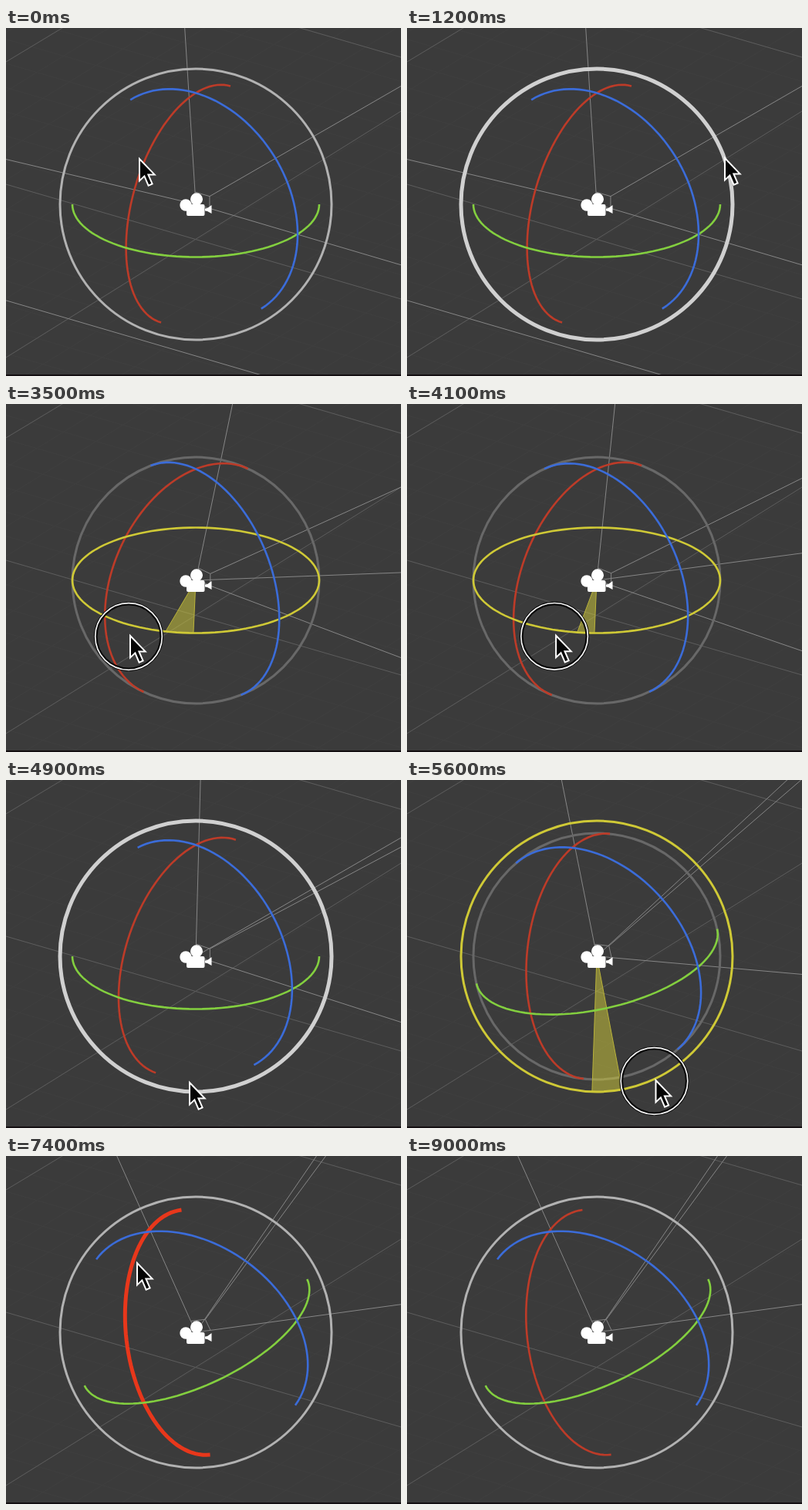
These frames come from a looping animation (512 px wide and 452 px high, 9500 ms). An HTML page:

```html
<!DOCTYPE html>
<html lang="en">
<head>
<meta charset="utf-8">
<title>Rotation gizmo</title>
<style>
html, body { margin: 0; width: 100%; height: 100%; overflow: hidden; background: #3b3b3b; }
svg { display: block; width: 512px; height: 452px; }
</style>
</head>
<body>
<svg id="stage" viewBox="0 0 512 452" fill="none">
  <rect width="512" height="452" fill="#3b3b3b"/>
  <path id="minor" stroke="#3f3f3f"/>
  <path id="major" stroke="#5c5c5c"/>
  <path id="frustum" stroke="#868686"/>
  <circle id="disc" cx="246" cy="229" r="160" stroke="#686868" stroke-width="3"/>
  <path id="wedge" fill="#d6cf3c" fill-opacity=".5" stroke="#b9b23a" stroke-width="1"/>
  <circle id="ring" cx="246" cy="229" r="176"/>
  <path id="x"/>
  <path id="y"/>
  <path id="z"/>
  <g fill="#fff">
    <circle cx="233" cy="230" r="7.7"/>
    <circle cx="247" cy="222.3" r="8"/>
    <rect x="234" y="229" width="23.5" height="15" rx="2"/>
    <path d="M258 234.5L261 234L266.5 230V241L261 238L258 237.5Z"/>
  </g>
  <g id="cursor">
    <g id="press">
      <circle cx="-1" cy="2" r="42.7" stroke="#080808" stroke-width="4.6"/>
      <circle cx="-1" cy="2" r="43.3" stroke="#f4f4f4" stroke-width="1.7"/>
    </g>
    <path d="M1 1V29.5L7.4 23.4L12.6 35.6L17.6 33.4L12.4 21.4H20.6Z" fill="#050505" stroke="#fff" stroke-width="2"/>
  </g>
  <rect y="450" width="512" height="2" fill="#140f12"/>
</svg>
<script>
const LOOP = 9500, FRAME = 100;
const CX = 246, CY = 229, R = 160, RING = 176;
const SP = 0.428, CP = Math.sqrt(1 - SP * SP);   // view pitch
const RAD = Math.PI / 180, PER_PX = 0.157;       // degrees turned per dragged pixel
const YAW = 34.4, GRAB_X = 243, DROP_X = 215.6;
const ROLL_X = 240, ROLL_END = 403;
const HALF_W = 0.765, HALF_H = 0.578, NEAR = 15, FAR = 53700;

const $ = id => document.getElementById(id);
const set = (id, attrs) => { for (const k in attrs) $(id).setAttribute(k, attrs[k]); };
const show = (id, on) => set(id, { display: on ? 'inline' : 'none' });

// time, x, y of the pointer tip
const moves = [
  [0, 172, 169], [400, 244, 188], [700, 244, 188], [1200, 411, 168], [1300, 411, 168],
  [1700, 434, 150], [2000, 405, 150], [2300, 405, 150], [2400, 337, 181], [3000, 243, 297],
  [3300, 243, 297], [3500, 160, 300], [3700, 125, 302], [4300, 215.6, 299], [4400, 215.6, 299],
  [4900, 237, 392], [5200, 240, 398], [6000, 403, 380], [6200, 366, 225], [6300, 352, 167],
  [6600, 423, 250], [6900, 350, 376], [7000, 350, 376], [7400, 169, 138], [8000, 230, 175],
  [8900, 230, 175]
];

// time, hovered or dragged handle
const modes = [
  [0, ''], [1000, 'z'], [1100, ''], [1200, 'ring'], [1500, ''], [1900, 'ring'], [2400, 'z'],
  [2700, ''], [2900, 'y'], [3100, 'dragY'], [4400, 'y'], [4600, ''], [4800, 'ring'],
  [5200, 'dragRing'], [6100, 'ring'], [6200, 'z'], [6500, 'ring'], [6600, ''],
  [6900, 'ring'], [7100, ''], [7300, 'x'], [7600, '']
];

const colors = {
  x: ['#bd3b28', '#e8371b'],
  y: ['#83cf3f', '#94f03a'],
  z: ['#3b6cd9', '#2f6dff'],
  ring: ['#b2b2b2', '#d0d0d0']
};
const ACTIVE = '#cfc936';

function tipAt(t) {
  let i = 0;
  while (i < moves.length - 2 && t >= moves[i + 1][0]) i++;
  const [t0, x0, y0] = moves[i], [t1, x1, y1] = moves[i + 1];
  const p = Math.min(1, (t - t0) / (t1 - t0)), e = p * p * (3 - 2 * p);
  return [x0 + (x1 - x0) * e, y0 + (y1 - y0) * e];
}

const modeAt = t => modes.filter(m => m[0] <= t).pop()[1];

function roll([x, y, w], deg) {
  const c = Math.cos(deg * RAD), s = Math.sin(deg * RAD);
  return [x * c - y * s, x * s + y * c, w];
}

const at = (x, y) => (CX + x).toFixed(2) + ' ' + (CY - y).toFixed(2);
const poly = pts => 'M' + pts.map(p => at(p[0], p[1])).join('L');

// circle around axis n; half of it faces the viewer
function orbit(n, full) {
  const k = Math.hypot(n[0], n[1]);
  const e = [-n[1] / k, n[0] / k];
  const g = [-n[2] * e[1], n[2] * e[0], n[0] * e[1] - n[1] * e[0]];
  const side = g[2] < 0 ? -R : R, steps = full ? 120 : 60, pts = [];
  for (let i = 0; i <= steps; i++) {
    const c = Math.cos(i * Math.PI / 60) * R, s = Math.sin(i * Math.PI / 60) * side;
    pts.push([e[0] * c + g[0] * s, e[1] * c + g[1] * s]);
  }
  return poly(pts);
}

function frustum(ax) {
  const corners = [[-1, 1], [1, 1], [1, -1], [-1, -1]].map(([i, j]) => [0, 1].map(q =>
    -ax.z[q] + i * HALF_W * ax.x[q] + j * HALF_H * ax.y[q]));
  const scaled = k => corners.map(c => [c[0] * k, c[1] * k]);
  const near = scaled(NEAR), far = scaled(FAR);
  return poly(near) + 'Z' + poly([far[3], far[2]]) +
    near.map((p, i) => {
      const len = Math.hypot(p[0], p[1]) || 1;
      return poly([p, [p[0] / len * 900, p[1] / len * 900]]);
    }).join('');
}

function wedge(from, to, point) {
  const pts = [[0, 0]];
  for (let i = 0; i <= 20; i++) pts.push(point((from + (to - from) * i / 20) * RAD));
  return poly(pts) + 'Z';
}

function grid() {
  const line = (y, slope) => `M0 ${y}L512 ${y + 512 * slope}`;
  let minor = '';
  for (let i = -10; i < 30; i++) minor += line(203 + i * 31.4, 0.291) + line(44 + i * 38.4, -0.618);
  set('minor', { d: minor });
  set('major', { d: line(203, 0.291) + line(-111, 0.291) + line(44, -0.603) + line(428, -0.625) });
}

function draw(time) {
  const t = Math.floor(time % LOOP / FRAME) * FRAME;
  const [px, py] = tipAt(t), mode = modeAt(t);
  const dragY = mode === 'dragY', dragRing = mode === 'dragRing', drag = dragY || dragRing;

  const turned = t < 3100 ? 0 : (GRAB_X - (dragY ? px : DROP_X)) * PER_PX;
  const rolled = t < 5200 ? 0 : ((dragRing ? px : ROLL_END) - ROLL_X) * PER_PX;
  const c = Math.cos((YAW + turned) * RAD), s = Math.sin((YAW + turned) * RAD);
  const axes = {
    x: roll([c, -SP * s, CP * s], rolled),
    y: roll([0, CP, SP], rolled),
    z: roll([-s, -SP * c, CP * c], rolled)
  };

  set('frustum', { d: frustum(axes) });
  for (const id of ['x', 'y', 'z']) {
    const on = mode === id, active = id === 'y' && dragY;
    set(id, {
      d: orbit(axes[id], active),
      stroke: active ? ACTIVE : colors[id][+on],
      'stroke-width': on ? 5 : 2.6
    });
  }

  const hot = mode === 'ring';
  set('ring', { stroke: dragRing ? ACTIVE : colors.ring[+hot], 'stroke-width': hot ? 5 : 3 });
  show('ring', !dragY);
  show('disc', drag);
  show('wedge', drag);
  if (dragY) {
    set('wedge', { d: wedge(-1.1, -1.1 - turned, q => [Math.sin(q) * R, -Math.cos(q) * R * SP]) });
  } else if (dragRing) {
    set('wedge', { d: wedge(-92, -92 + rolled, q => [Math.cos(q) * RING, Math.sin(q) * RING]) });
  }

  show('cursor', t < 8900);
  show('press', drag);
  set('cursor', { transform: `translate(${px.toFixed(2)} ${py.toFixed(2)})` });
}

grid();
draw(0);
const start = performance.now();
(function tick() {
  draw(performance.now() - start);
  requestAnimationFrame(tick);
})();
</script>
</body>
</html>
```
